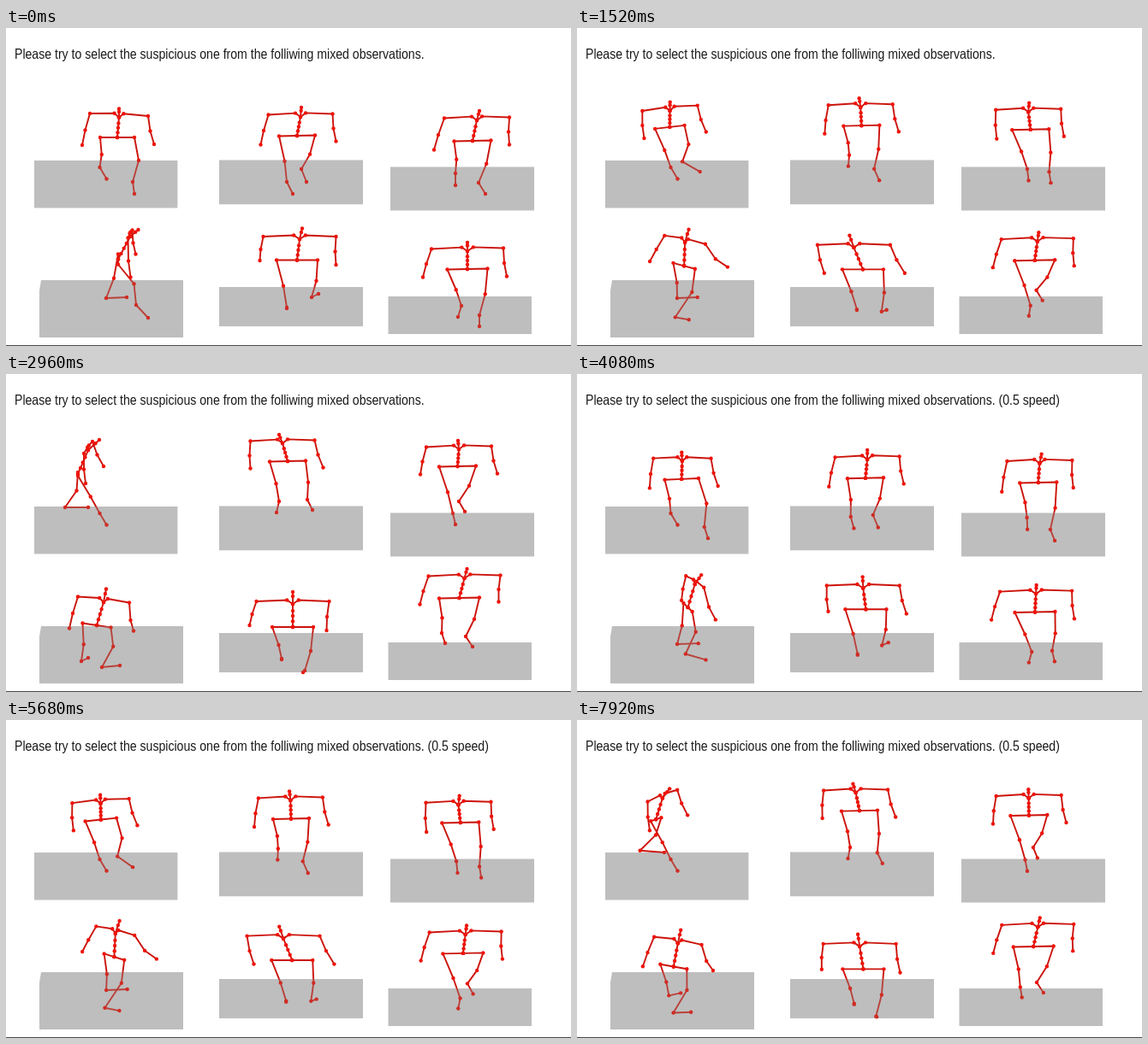
Write an HTML page with a canvas that moves like this. It is 660 px wide and 372 px high and loops after 8000 ms.

```html
<!DOCTYPE html>
<html lang="en">
<head>
<meta charset="utf-8">
<title>Walkers</title>
<style>
html, body { margin: 0; width: 100%; height: 100%; overflow: hidden; background: #fff; }
canvas { position: absolute; left: 0; top: 0; }
p {
  position: absolute; left: 10px; top: 20.6px; margin: 0;
  font: 17.2px/19px "Liberation Sans", Arial, sans-serif; color: #1a1a1a;
  white-space: pre; transform: scaleX(.82); transform-origin: 0 0;
}
</style>
</head>
<body>
<canvas id="stage" width="660" height="372"></canvas>
<p>Please try to select the suspicious one from the folliwing mixed observations.<span id="speed"> (0.5 speed)</span></p>
<script>
const LOOP = 8000, STEP = 80, SLOW_AT = 3040, WALK = 2960;
const ctx = document.getElementById('stage').getContext('2d');
const speed = document.getElementById('speed');

// A path is a few x, y points spread evenly over the walk.
// Only chest and ankles are stage positions: head, pelvis and hips, shoulders,
// hands and toes are offsets from the joint they hang on.
const walkers = [
  {
    floor: [33, 155, 167.4, 55.6],
    chest: [132, 101.5, 109, 94, 96, 86],
    head: [0, -7, 0, -7, 13, -9],
    shoulder: [34, 1.5, 33.5, -.5, 32.5, -3, 23, -6.5, 5, -7],
    pelvis: [-2, 26.5, 0, 22, -12, 31],
    hip: [20, 0, 17.5, -2, 0, -2],
    left: { hand: [-9, 37, 2, 32, 2, 35], ankle: [109.5, 163], toe: [8, 13.5] },
    right: {
      hand: [7, 33, 13, 29], knee: [6, 1],
      ankle: [148, 180, 147, 177, 125, 157, 80, 152, 69, 156],
      toe: [2, 14, 6, 13, 20, 12, 28, 4, 27, 0]
    }
  },
  {
    floor: [249, 154.5, 168, 51.7],
    chest: [344, 101, 331.5, 90, 323, 78],
    head: [1, -8, -4, -7],
    shoulder: [37.5, -.5],
    pelvis: [-4, 25, 6, 24],
    hip: [21, -.5],
    left: {
      hand: [-9, 35, 0, 32],
      ankle: [328, 180, 318, 163, 318, 149, 319, 149, 319, 149],
      toe: [7, 14, -1, 13, -3, 13]
    },
    right: {
      hand: [4, 32, 10, 32],
      ankle: [345, 165, 346, 165, 347, 165, 350, 159, 352, 147],
      toe: [6, 15, 6, 12]
    }
  },
  {
    floor: [449, 162.5, 168, 51],
    chest: [550, 105, 527.5, 95.5, 529, 85],
    head: [3, -8, -1, -7],
    shoulder: [38, -.5],
    pelvis: [-5, 27, 2.5, 23.5, -1.5, 23],
    hip: [21.5, -.5],
    left: { hand: [-12, 37, 1, 34, -7, 32], ankle: [525, 170, 526, 165, 522, 163], toe: [0, 14, 3, 13] },
    right: {
      hand: [0, 32, 7, 32],
      ankle: [552, 181, 553, 181, 552, 169, 536, 151, 529, 149],
      toe: [8, 13, 2, 13, 7, 12]
    }
  },
  {
    floor: [39, 295, 168, 67], cut: 2,
    chest: [145, 241, 126.5, 247.5, 114, 264],
    head: [9.5, -5, 4.5, -12, 3, -12.5],
    shoulder: [-2.5, 4.5, 14, 7, 23.5, 5, 26.5, 5, 30, 3.5],
    pelvis: [-14, 29.5, -1, 30.5, -8, 30],
    hip: [0, 6, 12.5, 3.5, 16.5, 2.5],
    left: {
      hand: [4, 28, -17, 30, -10, 37],
      ankle: [117, 316, 117, 316, 117, 316, 115, 317, 88, 336],
      toe: [24, -1, 24, -1, 8, -4]
    },
    right: {
      hand: [3, 46, 26, 27, 5, 33], elbow: [-1, 4], knee: [8, -1],
      ankle: [152, 324, 121, 329, 115, 338, 113, 342, 112, 343],
      toe: [14, 15, 25, 5, 16, 3, 20, 0, 21, -2]
    }
  },
  {
    floor: [249, 303, 168, 46],
    chest: [343, 244, 323.5, 253.5, 335, 266],
    head: [3, -9.5, -5, -11, 0, -11],
    shoulder: [42.5, 0],
    pelvis: [-3, 27.5, 10.5, 28.5, 0, 30],
    hip: [24, 0],
    left: { hand: [-4, 28, 8, 33, -8, 28], ankle: [328, 327, 327, 329, 322, 333], toe: [0, 1] },
    right: {
      hand: [0, 33, 17, 33, -3, 34],
      ankle: [357, 315, 356, 319, 356, 331, 350, 345, 349, 347],
      toe: [8, -4, 6, -2, -2, 2]
    }
  },
  {
    floor: [446.5, 314, 167.5, 44],
    chest: [539, 258, 535, 251, 540, 243, 535.5, 236],
    head: [0, -7, 3, -8],
    shoulder: [42, -.5],
    pelvis: [0, 24, -6, 26],
    hip: [23.5, -.5],
    left: {
      hand: [-10, 33],
      ankle: [532, 325, 531, 325, 530, 325, 522, 317, 509, 303],
      toe: [-4, 13, -2, 12, 4, 12]
    },
    right: {
      hand: [4, 33, -2, 31],
      ankle: [553, 336, 554, 320, 537, 307, 537, 307, 537, 307],
      toe: [0, 13, 7, 12, 8, 12]
    }
  }
];

const mix = (a, b, k) => a.map((v, i) => v + (b[i] - v) * k);
const add = (p, d, k = 1) => [p[0] + d[0] * k, p[1] + d[1] * k];

// Smooth curve through the points of a path, at progress k from 0 to 1
function along(path, k) {
  const last = path.length / 2 - 1;
  if (!last) return path;
  const i = Math.min(last - 1, Math.floor(k * last));
  const u = k * last - i;
  return [0, 1].map(axis => {
    const at = n => path[2 * n + axis];
    const slope = n => {
      const a = Math.max(0, n - 1), b = Math.min(last, n + 1);
      return (at(b) - at(a)) / (b - a);
    };
    const d = at(i + 1) - at(i), m0 = slope(i), m1 = slope(i + 1);
    return at(i) + u * (m0 + u * (3 * d - 2 * m0 - m1 + u * (m0 + m1 - 2 * d)));
  });
}

// Bone chains of one walker
function pose(w, k) {
  const at = path => along(path, k);
  const chest = at(w.chest), neck = add(chest, [0, 3]);
  const head = add(chest, at(w.head)), pelvis = add(chest, at(w.pelvis));
  const spine = [0, .25, .48, .7, 1].map(s => mix(pelvis, neck, s));

  const limbs = [[w.left, -1], [w.right, 1]].flatMap(([side, sign]) => {
    const shoulder = add(chest, at(w.shoulder), sign);
    const hand = add(shoulder, at(side.hand));
    const elbow = add(mix(shoulder, hand, .5), side.elbow || [-1, 1]);
    const collar = add(mix(chest, shoulder, .16), [0, -1.5]);
    const hip = add(pelvis, at(w.hip), sign);
    const ankle = at(side.ankle);
    const knee = add(mix(hip, ankle, .5), side.knee || [2, 2.5]);
    return [
      [neck, collar, shoulder, elbow, hand],
      [pelvis, hip, knee, ankle, add(ankle, at(side.toe))]
    ];
  });
  return [[...spine, mix(neck, head, .65), head], ...limbs];
}

function drawBones(chains, line, dot) {
  ctx.strokeStyle = line;
  ctx.fillStyle = dot;
  ctx.lineWidth = 1.9;
  ctx.lineJoin = 'round';
  for (const chain of chains) {
    ctx.beginPath();
    chain.forEach(p => ctx.lineTo(...p));
    ctx.stroke();
  }
  for (const p of chains.flat()) {
    ctx.beginPath();
    ctx.arc(...p, 2.2, 0, 2 * Math.PI);
    ctx.fill();
  }
}

function drawWalker(w, k) {
  const chains = pose(w, k);
  const [x, y, width, height] = w.floor, cut = w.cut || 0;
  drawBones(chains, '#cb130b', '#ee140a');
  // Seen through the floor, the bones look duller.
  ctx.save();
  ctx.beginPath();
  ctx.moveTo(x + cut, y);
  ctx.lineTo(x + width, y);
  ctx.lineTo(x + width, y + height);
  ctx.lineTo(x, y + height);
  ctx.lineTo(x, y + 6 * cut);
  ctx.closePath();
  ctx.fillStyle = '#bebebe';
  ctx.fill();
  ctx.clip();
  drawBones(chains, '#b9423b', '#d02c24');
  ctx.restore();
}

function render(now) {
  const t = Math.floor(now % LOOP / STEP) * STEP;
  const slow = t >= SLOW_AT;
  const k = (slow ? (t - WALK) / 2 : t) / WALK;
  speed.style.visibility = slow ? 'visible' : 'hidden';
  ctx.fillStyle = '#fff';
  ctx.fillRect(0, 0, 660, 372);
  for (const w of walkers) drawWalker(w, k);
  ctx.fillStyle = '#454a50';
  ctx.fillRect(0, 371, 660, 1);
}

const start = performance.now();
function tick() {
  render(performance.now() - start);
  requestAnimationFrame(tick);
}
tick();
</script>
</body>
</html>
```
